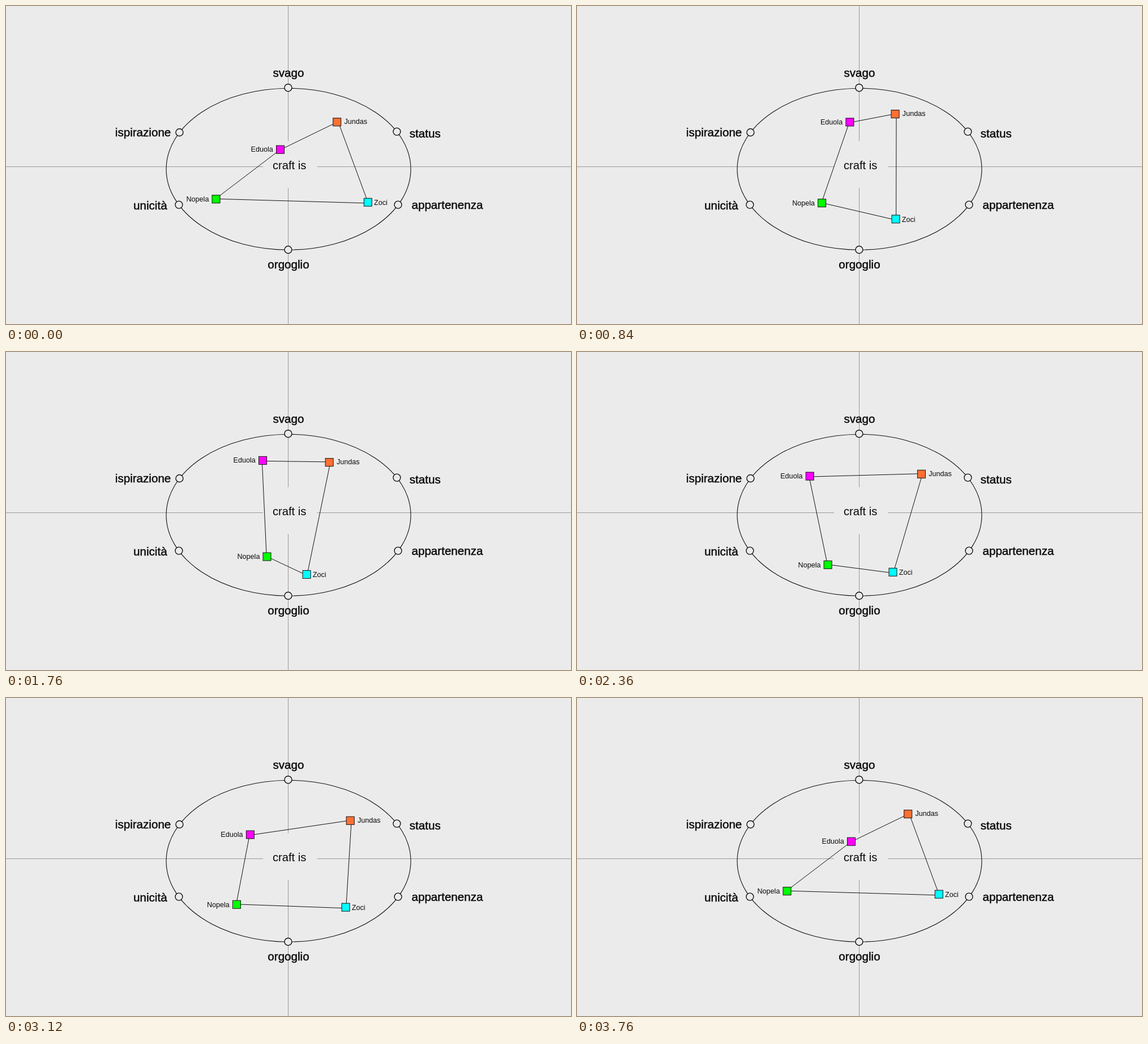
An HTML page that plays this animation: 998 by 561 pixels, repeating every 3920 ms.

```html
<!DOCTYPE html>
<html lang="it">
<head>
<meta charset="utf-8">
<title>craft is</title>
<style>
  html, body { margin: 0; width: 100%; height: 100%; overflow: hidden; background: #ebebeb; }
  svg { display: block; width: 998px; height: 561px; }
  text { font-family: "Liberation Sans", Arial, sans-serif; fill: #0a0a0a; }
  .axis { stroke: #999; stroke-width: 1; }
  .ring { fill: none; stroke: #111; stroke-width: 1.1; }
  .stop { fill: #ebebeb; stroke: #111; stroke-width: 1.4; }
  .word { font-size: 20.6px; stroke: #0a0a0a; stroke-width: .45px; }
  .core { font-size: 20.2px; text-anchor: middle; }
  .mid { text-anchor: middle; }
  .end { text-anchor: end; }
  .links { fill: none; stroke: #111; stroke-width: 1; }
  .node rect { stroke: #111; stroke-width: 1; }
  .node text { font-size: 12.6px; }
</style>
</head>
<body>
<svg viewBox="0 0 998 561">
  <path class="axis" d="M498.5 0V238.5M498.5 321V561M0 283.5H454M549.5 283.5H998"/>
  <ellipse class="ring" cx="499" cy="287.7" rx="216" ry="142.5"/>
  <g class="stop">
    <circle cx="498.4" cy="144.2" r="6.5"/>
    <circle cx="690.4" cy="221.6" r="6.5"/>
    <circle cx="692.5" cy="350.6" r="6.5"/>
    <circle cx="498.4" cy="430" r="6.5"/>
    <circle cx="305.4" cy="350.6" r="6.5"/>
    <circle cx="306.4" cy="223" r="6.5"/>
  </g>
  <g class="word">
    <text class="mid" x="499" y="125.3">svago</text>
    <text x="712.8" y="231.6">status</text>
    <text x="716.5" y="358.2">appartenenza</text>
    <text class="mid" x="499" y="462.6">orgoglio</text>
    <text class="end" x="284.6" y="358.6">unicità</text>
    <text class="end" x="291.3" y="230">ispirazione</text>
  </g>
  <text class="core" x="500.7" y="288.2">craft is</text>
  <polygon class="links" id="links"/>
  <g id="nodes"></g>
</svg>
<script>
  const LOOP = 3920, STEP = 40;
  const keys = [0, 1380, 2640, 3760];

  // path: one point per pose; label: text offset; tie: where the links attach
  const nodes = [
    { name: 'Eduola', color: '#ff00ff', label: [-12.8, 3.7], tie: [-1.2, 1],
      path: [[484.5, 253.2], [480.3, 173.8], [391.5, 232]] },
    { name: 'Jundas', color: '#ff7033', label: [12.8, 3.2], tie: [2, -.7],
      path: [[584.7, 204.7], [547.5, 181.5], [625.8, 225]] },
    { name: 'Zoci', color: '#00ffff', label: [10.8, 4.6], tie: [.6, 1.7],
      path: [[639.3, 346.2], [514, 395], [570.6, 386.4]] },
    { name: 'Nopela', color: '#00ff00', label: [-12.6, 4.4], tie: [-.8, -.5],
      path: [[371, 340.7], [472.3, 352], [434.8, 382]] }
  ];

  const make = (tag, attrs, parent) => {
    const el = document.createElementNS('http://www.w3.org/2000/svg', tag);
    for (const k in attrs) el.setAttribute(k, attrs[k]);
    return parent.appendChild(el);
  };

  const links = document.getElementById('links');
  const layer = document.getElementById('nodes');

  for (const n of nodes) {
    const [x, y] = n.label;
    n.el = make('g', { class: 'node' }, layer);
    make('rect', { x: -7, y: -7, width: 14, height: 14, fill: n.color }, n.el);
    make('text', { x, y, class: x < 0 ? 'end' : '' }, n.el).textContent = n.name;
  }

  function place(path, t) {
    const i = t < keys[1] ? 0 : t < keys[2] ? 1 : 2;
    const p = Math.min(1, (t - keys[i]) / (keys[i + 1] - keys[i]));
    const from = path[i], to = path[(i + 1) % 3];
    return from.map((v, k) => v + (to[k] - v) * p);
  }

  function draw(now) {
    const t = Math.floor((now % LOOP) / STEP) * STEP;
    const points = nodes.map(n => {
      const [x, y] = place(n.path, t);
      n.el.setAttribute('transform', `translate(${x} ${y})`);
      return [x + n.tie[0], y + n.tie[1]];
    });
    links.setAttribute('points', points.join(' '));
  }

  const start = performance.now();
  function tick() {
    draw(performance.now() - start);
    requestAnimationFrame(tick);
  }
  tick();
</script>
</body>
</html>
```
